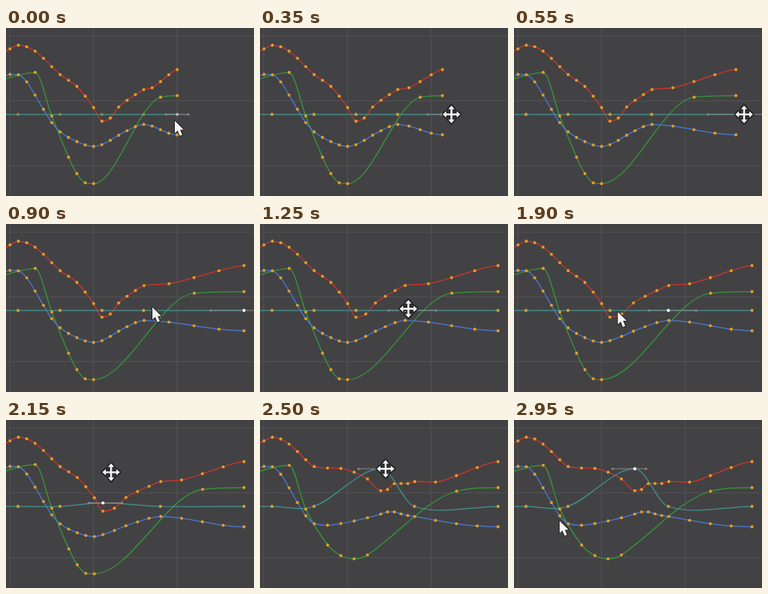
These frames come from a looping animation (310 by 210 pixels, 3 s). An HTML page with a canvas:

```html
<!DOCTYPE html>
<html>
<head>
<meta charset="utf-8">
<title>Curve editor</title>
<style>
html, body { margin: 0; width: 100%; height: 100%; overflow: hidden; background: #424244; }
canvas { display: block; }
</style>
</head>
<body>
<canvas id="stage" width="310" height="210"></canvas>
<script>
const ctx = document.getElementById('stage').getContext('2d');
const LOOP = 3000, STEP = 50, LAG = 50, BASE = 108, GAIN = 0.6, GAP = 10.45;
const KEY = '#e09e28', TEAL = '#43908f', GRAY = '#868688';
const REST = [15, 67.5, 120, 172, 214];

// Hand movements; those with a key drag that control key along
const glides = [
  { from: 80, to: 176, dx: 4, dy: -6 },
  { from: 176, to: 652, dx: 83.5, dy: 0, key: 4 },
  { from: 700, to: 900, dx: -115.5, dy: -6 },
  { from: 900, to: 1110, dx: -13, dy: 4 },
  { from: 1110, to: 1310, dx: 21, dy: 0, key: 3 },
  { from: 1550, to: 1950, dx: -64, dy: 2 },
  { from: 2060, to: 2400, dx: 31, dy: 0, key: 2 },
  { from: 2085, to: 2165, dx: 0, dy: -47, key: 2 },
  { from: 2750, to: 2950, dx: -101, dy: 63 }
];

function travel(x, y, t, list) {
  for (const g of list) {
    const u = Math.min(1, Math.max(0, (t - g.from) / (g.to - g.from)));
    const e = u * u * (3 - 2 * u);
    x += g.dx * e;
    y += g.dy * e;
  }
  return [x, y];
}

const slope = (a, b) => (b[1] - a[1]) / (b[0] - a[0]);
const smooth = (a, k, b) => slope(a, b);

// Flat at extremes, otherwise limited so the curve never overshoots a neighbour
function clamped(a, k, b) {
  const p = slope(a, k), q = slope(k, b);
  if (p * q <= 0) return 0;
  const limit = 3 * Math.min(Math.abs(p), Math.abs(q));
  return Math.max(-limit, Math.min(limit, slope(a, b)));
}

function slopes(keys, rule) {
  return keys.map((k, i) => i && i < keys.length - 1 ? rule(keys[i - 1], k, keys[i + 1]) : 0);
}

function valueAt(keys, m, x) {
  const n = keys.length - 1;
  if (x <= keys[0][0]) return keys[0][1];
  if (x >= keys[n][0]) return keys[n][1];
  const i = keys.findIndex(k => k[0] > x) - 1;
  const [x0, y0] = keys[i], [x1, y1] = keys[i + 1];
  const h = x1 - x0, u = (x - x0) / h, v = 1 - u;
  return y0 * v * v * (1 + 2 * u) + y1 * u * u * (1 + 2 * v)
    + h * u * v * (m[i] * v - m[i + 1] * u);
}

// Bakes a rough path into evenly spaced keys
function bake(path) {
  const m = slopes(path, clamped), keys = [];
  for (let i = -1; i <= 20; i++) {
    const x = 5 + i * GAP;
    keys.push([x, valueAt(path, m, x)]);
  }
  return keys;
}

const curves = [
  { color: '#38963a', keys: [[-34, 70.5], [36.5, 55.5], [57.2, 110], [78.2, 161.5], [88.6, 182],
    [99, 193.5], [109.5, 194.5], [193.2, 86.5], [214, 84.5]] },
  { color: '#4a78d0', keys: bake([[-6, 61], [5, 58], [15.5, 58.5], [26, 67.5], [57, 118], [68, 130],
    [88.6, 142], [109.5, 148], [151, 128.5], [172, 120.5], [214, 133.5]]) },
  { color: '#d0322b', keys: bake([[-6, 31], [15.5, 21.5], [36.4, 29], [68, 58.5], [88.6, 73],
    [109.5, 99.5], [120, 116.5], [130.4, 112.5], [141, 98.5], [172, 77], [183, 74.5],
    [203.5, 58.5], [214, 52]]) }
];

function retime(x, control) {
  if (x <= REST[0]) return x;
  let i = 0;
  while (i < REST.length - 2 && x > REST[i + 1]) i++;
  const a = control[i][0], b = control[i + 1][0];
  return a + (x - REST[i]) * (b - a) / (REST[i + 1] - REST[i]);
}

function strokeCurve(keys, m, color) {
  ctx.strokeStyle = color;
  ctx.lineWidth = 1.25;
  ctx.beginPath();
  ctx.moveTo(Math.min(0, keys[0][0]), keys[0][1]);
  ctx.lineTo(...keys[0]);
  for (let i = 1; i < keys.length; i++) {
    const [x0, y0] = keys[i - 1], [x1, y1] = keys[i], d = (x1 - x0) / 3;
    ctx.bezierCurveTo(x0 + d, y0 + m[i - 1] * d, x1 - d, y1 - m[i] * d, x1, y1);
  }
  ctx.stroke();
}

function dot(x, y, color, r = 1.9) {
  ctx.fillStyle = color;
  ctx.beginPath();
  ctx.arc(x, y, r, 0, Math.PI * 2);
  ctx.fill();
}

function drawGrid() {
  ctx.fillStyle = '#424244';
  ctx.fillRect(0, 0, 310, 210);
  ctx.fillStyle = '#535355';
  for (let i = 0; i < 3; i++) {
    ctx.fillRect(4.2 + i * 104.6, 0, 1, 210);
    ctx.fillRect(0, 9.6 + i * 81, 310, 1);
  }
}

function drawHandles(keys, m, i) {
  const [x, y] = keys[i];
  const left = (x - keys[i - 1][0]) / 3;
  const right = i < keys.length - 1 ? (keys[i + 1][0] - x) / 3 : left;
  ctx.strokeStyle = GRAY;
  ctx.lineWidth = 1.2;
  ctx.beginPath();
  ctx.moveTo(x - left, y - m[i] * left);
  ctx.lineTo(x + right, y + m[i] * right);
  ctx.stroke();
  dot(x - left, y - m[i] * left, GRAY, 1.5);
  dot(x + right, y + m[i] * right, GRAY, 1.5);
}

const arrow = new Path2D('M1 2V17.5L4.6 14.2L7.3 20.8L10.3 19.5L7.6 13.2H12.2Z');

const cross = new Path2D();
const arm = new Path2D('M-1.2 0V-6.5H-4L0-11L4-6.5H1.2V0Z');
for (let a = 0; a < 360; a += 90) cross.addPath(arm, new DOMMatrix().rotate(a));

function drawPointer(t) {
  const drag = [[150, 700], [1150, 1550], [2100, 2650]].some(([a, b]) => t >= a && t < b);
  const shape = drag ? cross : arrow;
  ctx.save();
  ctx.translate(...travel(210, 114, t, glides));
  ctx.lineJoin = 'round';
  ctx.lineWidth = drag ? 3.4 : 2;
  ctx.strokeStyle = '#222';
  ctx.stroke(shape);
  ctx.fillStyle = '#f4f4f4';
  ctx.fill(shape);
  ctx.restore();
}

function draw(t) {
  const control = REST.map((x, i) => travel(x, BASE, t - LAG, glides.filter(g => g.key === i)));
  const cm = slopes(control, smooth);
  const selected = t < 1150 ? 4 : t < 2050 ? 3 : 2;
  const idle = t < STEP;

  const bent = curves.map(({ color, keys }) => {
    const moved = keys.map(([x, y]) => {
      const nx = retime(x, control);
      return [nx, y + GAIN * (valueAt(control, cm, nx) - BASE)];
    });
    return { color, keys: moved };
  });

  drawGrid();
  for (const c of bent) strokeCurve(c.keys, slopes(c.keys, clamped), c.color);
  strokeCurve(control, cm, TEAL);
  drawHandles(control, cm, selected);
  for (const c of bent) for (const [x, y] of c.keys) dot(x, y, KEY);
  ctx.globalAlpha = idle ? 0.5 : 1;
  control.forEach(([x, y], i) => dot(x, y, i === selected ? '#fff' : KEY));
  ctx.globalAlpha = 1;
  drawPointer(t);
}

const start = performance.now();
function tick() {
  const t = (performance.now() - start) % LOOP;
  draw(Math.floor(t / STEP) * STEP);
  requestAnimationFrame(tick);
}
tick();
</script>
</body>
</html>
```
